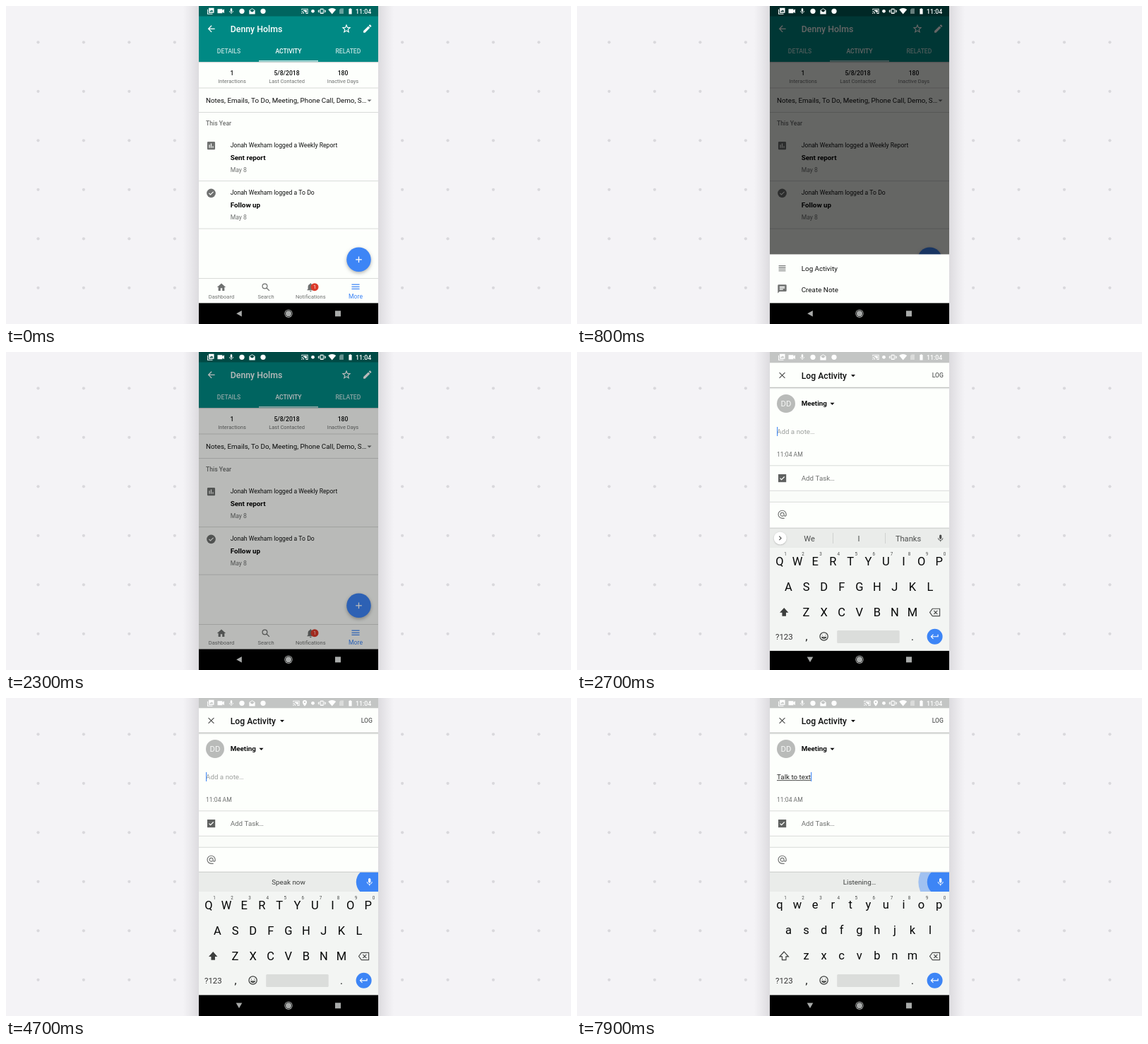
An HTML page with a canvas that plays this animation: 800 px wide and 450 px high, repeating every 8000 ms.

```html
<!DOCTYPE html>
<html lang="en">
<head>
<meta charset="utf-8">
<title>Log activity by voice</title>
<style>
html, body { margin: 0; width: 100%; height: 100%; overflow: hidden; background: #f4f3f6; }
canvas { display: block; width: 800px; height: 450px; }
</style>
</head>
<body>
<canvas id="stage"></canvas>
<script>
const LOOP = 8000, STEP = 100;
const L = 273, R = 527, W = R - L, NAV = 420.4;
const PAPER = '#fdfffc', TEAL = '#008984', BLUE = '#3d85f6', GREY = '#6f7170', INK = '#0e0f0f', RULE = '#d9dbd9';

const canvas = document.getElementById('stage');
const c = canvas.getContext('2d');
const dpr = window.devicePixelRatio || 1;
canvas.width = 800 * dpr;
canvas.height = 450 * dpr;

// Icons on a 24-unit grid
const BACK = 'M20 11H7.8l5.6-5.6L12 4l-8 8 8 8 1.4-1.4L7.8 13H20z';
const CLOSE = 'M5 5L19 19M19 5L5 19';
const STAR = 'M12 4l2.3 5.5 5.9.5-4.5 3.9 1.4 5.8-5.1-3.1-5.1 3.1 1.4-5.8L3.8 10l5.9-.5z';
const PENCIL = 'M3 17.2V21h3.8L17.8 9.9l-3.7-3.7zM20.7 7a1 1 0 0 0 0-1.4l-2.3-2.3a1 1 0 0 0-1.4 0l-1.9 1.8 3.8 3.8z';
const HOME = 'M10 20v-6h4v6h5v-8h3L12 3 2 12h3v8z';
const LENS = 'M15 9.5a5.5 5.5 0 1 1-11 0a5.5 5.5 0 1 1 11 0M13.6 13.6L20 20';
const BELL = 'M10 20h4a2 2 0 0 1-4 0zM18 16v-5c0-3-1.6-5.6-4.5-6.3V4a1.5 1.5 0 0 0-3 0v.7C7.6 5.4 6 8 6 11v5l-2 2v1h16v-1z';
const MENU = 'M3 7H21M3 12H21M3 17H21';
const LINES = 'M4 6H20M4 10H20M4 14H20M4 18H20';
const CHART = 'M5 3h14a2 2 0 0 1 2 2v14a2 2 0 0 1-2 2H5a2 2 0 0 1-2-2V5a2 2 0 0 1 2-2zM7 10v7h2v-7zM11 7v10h2V7zM15 13v4h2v-4z';
const TICK = 'M6 12l4 4 8-8';
const CHAT = 'M4 2h16a2 2 0 0 1 2 2v12a2 2 0 0 1-2 2H6l-4 4V4a2 2 0 0 1 2-2zM6 6v2h12V6zM6 9v2h12V9zM6 12v2h8v-2z';
const MIC = 'M12 2a3 3 0 0 1 3 3v6a3 3 0 0 1-6 0V5a3 3 0 0 1 3-3zM17.3 11H19a7 7 0 0 1-6 6.7V21h-2v-3.3A7 7 0 0 1 5 11h1.7a5.3 5.3 0 0 0 10.6 0z';
const AT = 'M17 21h-5a9 9 0 1 1 9-9v1.4a2.5 2.5 0 0 1-5 0V12a4 4 0 1 0-1.2 2.8';
const SHIFT = 'M12 3L3 13h5v7h8v-7h5z';
const ERASE = 'M7 4H23V20H7L1.2 12zM10 8l8 8M18 8l-8 8';
const SMILE = 'M21 12a9 9 0 1 1-18 0a9 9 0 1 1 18 0M7.5 14a5 5 0 0 0 9 0zM8.5 8.8v1.4M15.5 8.8v1.4';
const ENTER = 'M21 7v6H5.8l3.6 3.6L8 18l-6-6 6-6 1.4 1.4L5.8 11H19V7z';
const CHEVRON = 'M9 6l6 6-6 6';
const PHOTOS = 'M7 3h15v14H7zM9 14h11l-4-6-3 4-2-2zM3 7h2v12h13v2H3z';
const VIDEO = 'M2 6h14v4l5-4v12l-5-4v4H2z';
const MAIL = 'M3 9l9-6 9 6v12H3zM5 10l7 5 7-5-7-5z';
const CAST = 'M2 4h20v16h-7v-2h5V6H4v3H2zM2 12a8 8 0 0 1 8 8H8a6 6 0 0 0-6-6zM2 17a3 3 0 0 1 3 3H2zM7 8h11v8h-4a9 9 0 0 0-7-6z';
const VIBRATE = 'M7 4h10v16H7zM9 7v10h6V7zM0 9h2v6H0zM3 7h2v10H3zM19 7h2v10h-2zM22 9h2v6h-2z';
const WIFI = 'M12 21L0 7a18 18 0 0 1 24 0z';
const SIM = 'M9 3h10v18H5V7z';
const BATTERY = 'M10 2h4v2h3v18H7V4h3z';
const PIN = 'M12 2a7 7 0 0 0-7 7c0 5 7 13 7 13s7-8 7-13a7 7 0 0 0-7-7zM12 6.5a2.5 2.5 0 1 1 0 5a2.5 2.5 0 0 1 0-5z';

const clamp = x => Math.max(0, Math.min(1, x));
const span = (t, a, b) => clamp((t - a) / (b - a));
const easeOut = u => 1 - (1 - u) ** 3;

function rect(x, y, w, h, fill) {
  c.fillStyle = fill;
  c.fillRect(x, y, w, h);
}

function disc(x, y, r, fill) {
  c.fillStyle = fill;
  c.beginPath();
  c.arc(x, y, r, 0, Math.PI * 2);
  c.fill();
}

function shadow(color, blur, dy) {
  c.shadowColor = color;
  c.shadowBlur = blur * dpr;
  c.shadowOffsetY = dy * dpr;
}

function rule(y) { rect(L, y - 0.5, W, 1, RULE); }

// y is the middle of the capitals
function text(str, x, y, size, fill, weight = 400, align = 'left') {
  c.font = `${weight} ${size}px Roboto, "Noto Sans", sans-serif`;
  c.textAlign = align;
  c.fillStyle = fill;
  c.fillText(str, x, y + size * 0.355);
}

function label(str, x, y, size, fill, weight) { text(str, x, y, size, fill, weight, 'center'); }

// A line width draws the icon as an outline
function icon(path, x, y, color, size = 14.8, line = 0) {
  const p = new Path2D(path);
  c.save();
  c.translate(x, y);
  c.scale(size / 24, size / 24);
  c.translate(-12, -12);
  if (line) {
    c.strokeStyle = color;
    c.lineWidth = line;
    c.stroke(p);
  } else {
    c.fillStyle = color;
    c.fill(p, 'evenodd');
  }
  c.restore();
}

function triangle(x, y, w, h, color) {
  c.fillStyle = color;
  c.beginPath();
  c.moveTo(x - w / 2, y - h / 2);
  c.lineTo(x + w / 2, y - h / 2);
  c.lineTo(x, y + h / 2);
  c.fill();
}

function backdrop() {
  rect(0, 0, 800, 450, '#f4f3f6');
  for (let col = 0; col < 12; col++)
    for (let row = 0; row < 6; row++)
      disc(45.5 + col * 64.45, 51.3 + row * 69.5, 2.1, '#d9d8dc');
  for (const [edge, dir] of [[L, -1], [R, 1]]) {
    const g = c.createLinearGradient(edge, 0, edge + dir * 22, 0);
    g.addColorStop(0, 'rgba(30,25,35,.11)');
    g.addColorStop(0.5, 'rgba(30,25,35,.05)');
    g.addColorStop(1, 'rgba(30,25,35,0)');
    rect(Math.min(edge, edge + dir * 22), 0, 22, 450, g);
  }
}

function statusIcons(located) {
  const y = 7.3, w = '#fff';
  icon(PHOTOS, 289.5, y, w, 12);
  icon(VIDEO, 304.5, y, w, 12);
  icon(MIC, 319, y, w, 10);
  disc(334, y, 3.6, w);
  icon(MAIL, 348.5, y, w, 11);
  disc(364, y, 3.6, w);
  icon(CAST, located ? 411 : 423, y, w, 11);
  if (located) icon(PIN, 423, y, w, 10.5);
  disc(434.5, y, 2.4, w);
  icon(VIBRATE, 447.3, y, w, 11);
  icon(WIFI, 461.7, y, w, 11);
  icon(SIM, 475, y, 'rgba(255,255,255,.4)', 10);
  icon(BATTERY, 487.5, y, w, 10);
  text('11:04', 495, 7.6, 8.8, w, 500);
}

function entry(y, glyph, kind, title) {
  if (glyph === CHART) icon(CHART, 290.5, y + 1, GREY);
  else {
    disc(290.5, y + 0.8, 6.3, GREY);
    icon(TICK, 290.5, y + 0.8, PAPER, 12.5, 2.2);
  }
  text('Jonah Wexham logged a ' + kind, 317.7, y, 8.65, INK);
  text(title, 317.7, y + 17.6, 9.87, '#050505', 700);
  text('May 8', 317.7, y + 35, 8.65, GREY);
  rule(y + 51);
}

function activityScreen() {
  rect(L, 0, W, 450, PAPER);
  rect(L, 79, W, 1.2, '#d3d6d4');
  rect(L, 0, W, 79, TEAL);
  rect(L, 0, W, 14.5, '#00655f');
  icon(BACK, 290.7, 32.3, '#fff');
  text('Denny Holms', 317.7, 32.6, 12.35, '#fff', 500);
  icon(STAR, 482, 32, '#fff', 14.8, 1.9);
  icon(PENCIL, 511.7, 32, '#fff', 15);
  const faint = 'rgba(255,255,255,.75)';
  label('DETAILS', 315.5, 64.3, 8.6, faint, 500);
  label('ACTIVITY', 400, 64.3, 8.6, '#fff', 500);
  label('RELATED', 484.4, 64.3, 8.6, faint, 500);
  rect(358, 77.2, 84, 1.3, '#fff');

  const stats = [[320, '1', 'Interactions'], [397.5, '5/8/2018', 'Last Contacted'], [477, '180', 'Inactive Days']];
  for (const [x, value, name] of stats) {
    label(value, x, 95.2, 8.65, INK, 500);
    label(name, x, 106, 7.5, GREY);
  }
  rule(116);
  text('Notes, Emails, To Do, Meeting, Phone Call, Demo, S…', 283, 133.4, 9.8, INK);
  triangle(514.5, 134, 6, 3, GREY);
  rule(150.5);
  text('This Year', 283, 166, 8.65, GREY, 500);
  entry(196.6, CHART, 'Weekly Report', 'Sent report');
  entry(264.1, TICK, 'To Do', 'Follow up');

  c.save();
  shadow('rgba(0,0,0,.3)', 5, 2);
  disc(499.5, 358.8, 17.3, BLUE);
  c.restore();
  rect(495.2, 358.2, 8.6, 1.3, '#fff');
  rect(498.85, 354.5, 1.3, 8.6, '#fff');

  rule(385.5);
  icon(HOME, 305, 398, GREY);
  icon(LENS, 368, 398, GREY, 14.8, 2);
  icon(BELL, 431.3, 398, GREY);
  disc(437, 397.7, 5.5, '#dc3a2a');
  label('1', 437, 397.8, 6.5, '#fff');
  icon(MENU, 495, 397.3, BLUE, 14.8, 2);
  label('Dashboard', 305, 411.6, 7.5, GREY);
  label('Search', 368, 411.6, 7.5, GREY);
  label('Notifications', 431.3, 411.6, 7.5, GREY);
  label('More', 495, 411.4, 8.7, BLUE);
}

function sheet(shown, press) {
  if (shown <= 0) return;
  const top = NAV - 69 * shown;
  rect(L, top, W, 70, PAPER);
  if (press > 0) rect(L, top, W, 35, `rgba(0,0,0,${0.1 * press})`);
  icon(LINES, 290.5, top + 19.7, GREY, 14.8, 1.7);
  icon(CHAT, 290.5, top + 49, GREY);
  text('Log Activity', 317.7, top + 20.3, 9.87, INK);
  text('Create Note', 317.7, top + 49.8, 9.87, INK);
}

function logScreen(t, dy) {
  rect(L, 0, W, 450, PAPER);
  c.save();
  c.translate(0, dy);
  rect(L, 48.8, W, 1.2, '#bfc1bf');
  rect(L, 50, W, 1.5, '#eceeec');
  icon(CLOSE, 290.5, 32, '#4a4c4b', 13.5, 2);
  text('Log Activity', 317.7, 32.7, 12.2, INK, 500);
  triangle(391, 32.6, 6, 3.2, INK);
  text('LOG', 502.7, 32.3, 8.65, '#5f6160', 500);
  disc(296, 72, 13, '#b9bbb9');
  label('DD', 296, 72.4, 11.4, '#f6f7f6');
  text('Meeting', 317.7, 72, 9.8, INK, 700);
  triangle(361.5, 72.3, 6, 3.2, INK);

  const note = t < 6700 ? '' : t < 7400 ? 'Talk to' : 'Talk to text';
  text(note || 'Add a note…', 283, 112, 9.8, note ? '#222' : '#9da09e');
  const end = note ? 283 + c.measureText(note).width : 283;
  if (note) rect(283, 116.3, end - 283, 0.8, '#222');
  if ((t - 600) % 1000 < 500) rect(end + 0.1, 105, 1.1, 13, BLUE);

  text('11:04 AM', 283, 144, 8.65, GREY);
  rule(159.8);
  rect(285, 172, 11.2, 11.2, '#5f6160');
  icon(TICK, 290.6, 177.6, PAPER, 12.5, 2.4);
  text('Add Task…', 317.7, 178, 9.8, GREY);
  rect(L, 195, W, 16, '#fafcf9');
  rule(195.3);
  rule(211.3);
  icon(AT, 290.6, 228.8, GREY, 14.8, 1.9);
  c.restore();
  rect(L, 0, W, 14.3 + Math.min(dy, 1), '#c3c5c4');
}

function suggestions() {
  c.save();
  shadow('rgba(0,0,0,.25)', 2, 0.6);
  disc(287.7, 260.5, 9, '#fff');
  c.restore();
  icon(CHEVRON, 287.7, 260.5, '#444', 11, 2.4);
  label('We', 329, 261, 11.1, '#4b4d4c');
  label('I', 399, 261, 11.1, '#4b4d4c');
  label('Thanks', 469, 261, 11.1, '#4b4d4c');
  for (const x of [362.5, 436.5]) rect(x - 0.5, 253, 1, 15, '#cfd1d0');
  icon(MIC, 514.7, 260.7, '#4b4d4c', 12.5);
}

function voiceStrip(t) {
  if (t >= 4100) label(t < 5400 ? 'Speak now' : 'Listening…', 400, 260.7, 9.8, '#3c3e3d');
  const level = span(t, 5200, 5600);
  const pulse = 31 + 6 * Math.cos((t - 6100) / 426 * Math.PI * 2);
  if (level > 0) disc(515.3, 260.5, 19.5 + (pulse - 19.5) * level, '#a0c1f1');
  disc(515.3, 260.5, 19.5 * easeOut(span(t, 3850, 4150)), BLUE);
  icon(MIC, 514.7, 260.5, '#fff', 13.5);
}

// Small letters sit a little higher than capitals
function keyRow(keys, x, y, upper) {
  const row = upper ? keys : keys.toLowerCase();
  [...row].forEach((k, i) => label(k, x + i * 25.07, upper ? y : y - 1.1, 16.5, '#060707'));
}

function keyboard(t, dy) {
  const upper = t < 6700;
  c.save();
  c.beginPath();
  c.rect(L, 0, W, 450);
  c.clip();
  c.translate(0, dy);
  rect(L, 246, W, 180, '#f3f5f3');
  rect(L, 246, W, 28, '#eaecea');
  rect(L, 245.7, W, 1, '#c9cbc9');

  c.save();
  c.beginPath();
  c.rect(L, 246.7, W, 27.3);
  c.clip();
  if (t < 3900) suggestions();
  else voiceStrip(t);
  c.restore();

  keyRow('QWERTYUIOP', 287, 293, upper);
  for (let i = 0; i < 10; i++) label(String((i + 1) % 10), 295 + i * 25.07, 283, 6.3, '#4b4d4c');
  keyRow('ASDFGHJKL', 299.5, 329.2, upper);
  keyRow('ZXCVBNM', 324.5, 365.5, upper);
  icon(SHIFT, 293.2, 365.2, '#3c3e3d', 16.5, upper ? 0 : 1.7);
  icon(ERASE, 506.5, 365.5, '#4b4d4c', 15.5, 1.8);
  label('?123', 293.3, 400.1, 11.4, '#333');
  label(',', 325, 400, 15, INK);
  icon(SMILE, 349.6, 399.5, '#3c3e3d', 15, 2);
  c.fillStyle = '#dbdddb';
  c.beginPath();
  c.roundRect(368.2, 391, 88.5, 18, 1.5);
  c.fill();
  label('.', 475, 400, 15, INK);
  disc(506.6, 399.8, 11, BLUE);
  icon(ENTER, 506.4, 399.8, '#fff', 14);
  c.restore();
}

function navBar(top, typing) {
  const tone = '#a9abaa';
  rect(L, top, W, 450 - top, '#000');
  c.save();
  c.translate(330, 435.2);
  if (!typing) c.rotate(Math.PI / 2);
  triangle(0, 0, 8.6, 7.6, tone);
  c.restore();
  disc(400, 435.2, 5.7, tone);
  disc(400, 435.2, 4.8, '#000');
  disc(400, 435.2, 4, tone);
  rect(466, 431.3, 8, 8, tone);
}

function draw(t) {
  c.setTransform(dpr, 0, 0, dpr, 0, 0);
  backdrop();
  c.save();
  c.beginPath();
  c.rect(L, 0, W, 450);
  c.clip();

  const fade = span(t, 2350, 2550);
  if (fade < 1) {
    activityScreen();
    const dim = 0.6 * (span(t, 350, 700) - span(t, 2050, 2505));
    rect(L, 0, W, NAV, `rgba(0,0,0,${dim})`);
    sheet(easeOut(span(t, 350, 700)) - span(t, 2050, 2280) ** 2, span(t, 1850, 2000));
  }
  if (fade > 0) {
    c.globalAlpha = fade;
    logScreen(t, 115 * (1 - easeOut(span(t, 2350, 2790))));
    c.globalAlpha = 1;
    if (t > 2440) keyboard(t, 174 * (1 - easeOut(span(t, 2440, 2790))));
  }
  statusIcons(t >= 4100);
  navBar(t > 2440 && t < 2790 ? NAV + 2.5 : NAV, t > 2440);
  c.restore();
}

const start = performance.now();
function tick() {
  const t = (performance.now() - start) % LOOP;
  draw(Math.floor(t / STEP) * STEP);
  requestAnimationFrame(tick);
}
tick();
</script>
</body>
</html>
```
